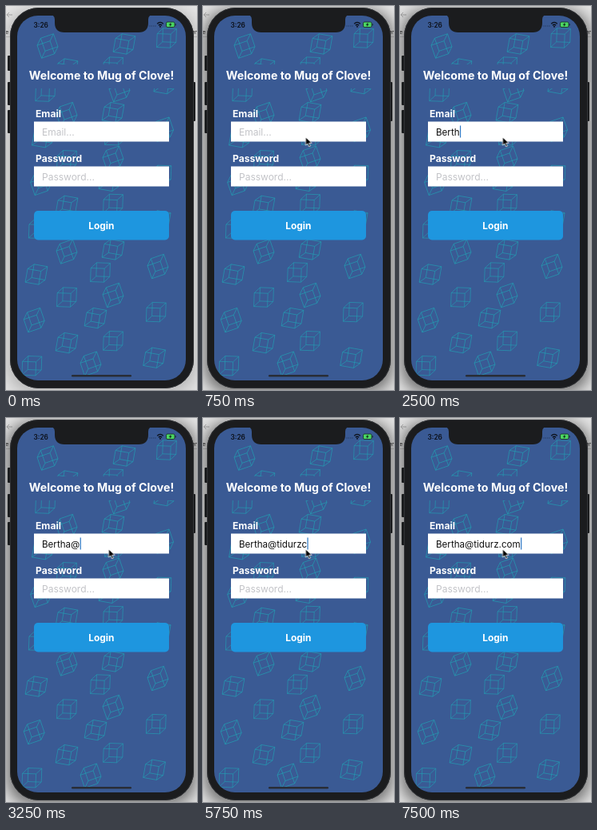
Animation, 239 px wide and 480 px high, one loop 8000 ms. Source, as an HTML page:

```html
<!DOCTYPE html>
<html lang="en">
<head>
<meta charset="utf-8">
<title>Login screen</title>
<style>
  html, body { margin: 0; width: 100%; height: 100%; overflow: hidden; background: #dcdcdc; }
  svg { display: block; width: 100vw; height: 100vh; }
  text { font-family: Inter, "Liberation Sans", sans-serif; }
  .bold { font-weight: 700; fill: #fff; }
  .hint { font-size: 12px; fill: #c3c4c8; }
  .cubes { fill: none; stroke: #20aab9; stroke-width: .65; opacity: .85; }
  #pointer { animation: pointer 8s step-end infinite; }
  #shadow { animation: focus 8s step-end infinite; }
  @keyframes pointer {
    0% { transform: translate(114px, 212px); opacity: 0; }
    3.125% { transform: translate(114px, 212px); opacity: 1; }
    6.25%, 100% { transform: translate(128.5px, 164px); opacity: 1; }
  }
  @keyframes focus {
    0% { opacity: .4; }
    9.375%, 100% { opacity: 1; }
  }
</style>
</head>
<body>
<svg viewBox="0 0 239 480">
  <defs>
    <clipPath id="screen"><rect x="14" y="12" width="211" height="456" rx="26"/></clipPath>
    <filter id="blur" x="-20%" y="-20%" width="140%" height="140%"><feGaussianBlur stdDeviation="9"/></filter>
    <path id="cube" d="M-12-5H5V12H-12ZM-5-12H12V5H-5ZM-12-5L-5-12M5-5L12-12M5 12L12 5M-12 12L-5 5"/>
  </defs>

  <!-- window behind the phone -->
  <rect width="239" height="480" fill="#e4e4e4"/>
  <path d="M0 38.5H239" stroke="#c4c4c4"/>
  <path d="M8 11H1M4 8L1 11L4 14" fill="none" stroke="#999" stroke-width=".8"/>
  <g font-size="7" fill="#333">
    <text x="-3" y="35">te</text>
    <text x="232" y="35">en</text>
  </g>
  <rect id="shadow" x="1" y="4" width="237" height="480" rx="32" fill="#000" fill-opacity=".5" filter="url(#blur)"/>

  <!-- phone -->
  <g fill="#1b1c1e">
    <rect x="2" y="62" width="5" height="19" rx="1"/>
    <rect x="2" y="95" width="5" height="29" rx="1"/>
    <rect x="2" y="130" width="5" height="29" rx="1"/>
    <rect x="232" y="95" width="5" height="49" rx="1"/>
    <rect x="5" y="2" width="230" height="476" rx="36"/>
  </g>
  <rect x="5.5" y="2.5" width="229" height="475" rx="35.5" fill="none" stroke="#303235"/>

  <g clip-path="url(#screen)">
    <rect x="14" y="12" width="211" height="456" fill="#3a5a94"/>
    <g id="cubes" class="cubes"></g>
    <rect x="14" y="73" width="211" height="30" fill="#3a5a94"/>
    <path d="M55 11Q61 11 61 17V21Q61 33 73 33H166Q178 33 178 21V17Q178 11 184 11Z" fill="#1b1c1e"/>
    <rect x="82" y="461" width="75" height="2.5" rx="1.2" fill="#292d36"/>
  </g>

  <!-- status bar -->
  <text x="34.5" y="26.5" font-size="8.3" font-weight="600" fill="#0c1019">3:26</text>
  <path d="M179.5 25H188" stroke="#24395f" stroke-width="1.2" stroke-dasharray="1.2 1.1"/>
  <g fill="none" stroke="#0c1019" stroke-width="1.3">
    <path d="M189.2 22.2Q193 18.6 196.8 22.2M190.9 24.2Q193 22.2 195.1 24.2"/>
    <circle cx="193" cy="25.7" r=".4"/>
  </g>
  <rect x="200.5" y="20" width="10.5" height="6.5" rx="1.6" fill="#4bd663" stroke="#16291f" stroke-width=".8"/>
  <path d="M206.5 20.5L203.8 23.7H205.5L204.7 26L207.7 22.8H206Z" fill="#10211a"/>
  <path d="M212.2 22.3V24.3" stroke="#16291f"/>

  <!-- form -->
  <text class="bold" x="119.5" y="92.3" font-size="14.2" text-anchor="middle">Welcome to Mug of Clove!</text>
  <g class="bold" font-size="12.1">
    <text x="37" y="138.8">Email</text>
    <text x="37" y="194.8">Password</text>
  </g>
  <g fill="#fff">
    <rect x="35" y="144.5" width="169" height="25"/>
    <rect x="35" y="200.5" width="169" height="25"/>
  </g>
  <text id="emailHint" class="hint" x="45" y="161.6">Email...</text>
  <text id="email" x="45" y="161.6" font-size="11.6" fill="#111"></text>
  <rect id="caret" y="149.5" width="1.2" height="15" fill="#2e79c5"/>
  <text class="hint" x="45" y="217.6">Password...</text>
  <rect x="35" y="256" width="169" height="36.5" rx="5" fill="#1e96df"/>
  <text class="bold" x="119.3" y="279" font-size="11.9" text-anchor="middle">Login</text>

  <path id="pointer" d="M0 0V10.2L2.4 8L4.1 11.8L5.9 11L4.2 7.3H7.6Z" fill="#000" stroke="#fff" stroke-width=".8"/>
</svg>
<script>
  const $ = id => document.getElementById(id);
  const LOOP = 8000;
  const TICK = 250;
  const CHARS_PER_TICK = 1.5;
  const FOCUS_TICK = 4;
  const ADDRESS = "Bertha@tidurz.com";
  const NAME_END = ADDRESS.indexOf(".");

  // Rows alternate between three drifting columns and two fixed ones.
  function cubeMarkup(row, column) {
    const tilt = [-19, 10, 2][(row + column) % 3];
    const x = row % 2
      ? 76 + 58 * column
      : [52, 148, 201][column] - [1.4, 3, 1.1][column] * row;
    const y = 50 + 28.55 * row - 2.5 * column ** 2;
    return `<use href="#cube" transform="translate(${x} ${y}) rotate(${tilt})"/>`;
  }

  let markup = "";
  for (let row = 0; row < 15; row++)
    for (let column = 0; column < 3 - row % 2; column++)
      markup += cubeMarkup(row, column);
  $("cubes").innerHTML = markup;

  // Typing comes in bursts of even speed.
  const bursts = [
    { tick: 8, from: 2, to: 6 },
    { tick: 13, from: 7, to: 7 },
    { tick: 15, from: 9, to: NAME_END },
    { tick: 28, from: NAME_END + 1, to: ADDRESS.length }
  ];

  function textAt(tick) {
    const burst = bursts.findLast(b => b.tick <= tick);
    if (!burst) return "";
    const length = Math.floor(burst.from + (tick - burst.tick) * CHARS_PER_TICK);
    // Two letters typed without the dot, then deleted again.
    const slip = "co".slice(0, Math.max(0, 2 - Math.abs(tick - 24)));
    return ADDRESS.slice(0, Math.min(length, burst.to)) + slip;
  }

  // The caret blinks once a second, starting over at each key.
  function caretShown(tick) {
    let idle = 0;
    while (tick - idle > FOCUS_TICK && textAt(tick - idle - 1) === textAt(tick)) idle++;
    return tick >= FOCUS_TICK && idle % 4 < 2;
  }

  const clock = document.timeline;
  const start = clock.currentTime || 0;
  for (const animation of document.getAnimations()) animation.startTime = start;

  function draw() {
    const time = ((clock.currentTime || 0) - start) % LOOP;
    const tick = Math.floor(time / TICK);
    const text = textAt(tick);
    $("email").textContent = text;
    $("emailHint").style.opacity = text ? 0 : 1;
    $("caret").setAttribute("x", 45.4 + (text ? $("email").getComputedTextLength() : 0));
    $("caret").style.opacity = caretShown(tick) ? 1 : 0;
    requestAnimationFrame(draw);
  }
  draw();
</script>
</body>
</html>
```
